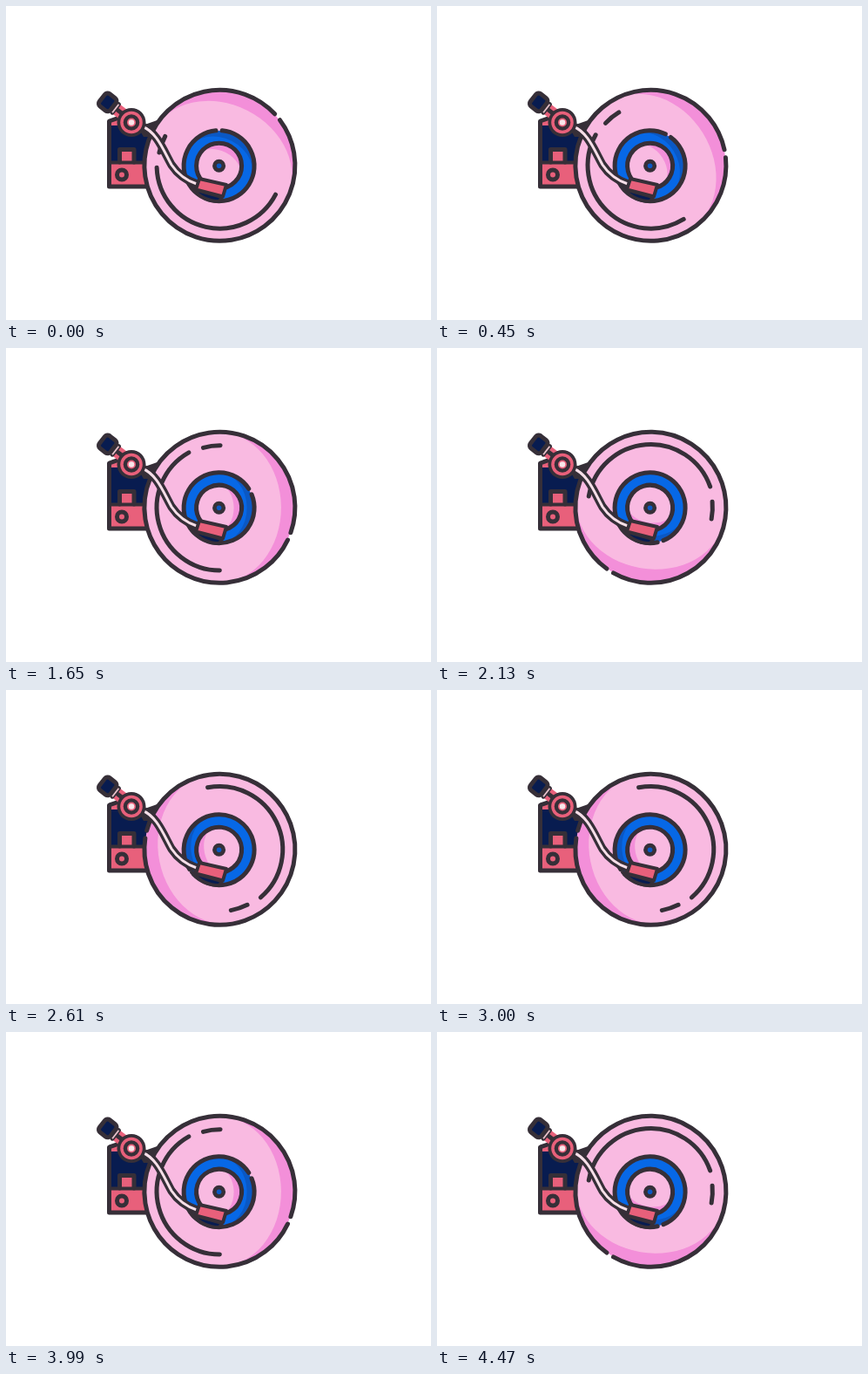
Recreate the animation shown at these times as an HTML page. Size 488 by 360 pixels, loop 4500 ms.

```html
<!DOCTYPE html>
<html>
<head>
<meta charset="utf-8">
<style>
  html, body { margin: 0; width: 100%; height: 100%; overflow: hidden; background: #fff; }
  svg { display: block; width: 100vw; height: 100vh; }
  .line { stroke: #362f38; stroke-width: 5; stroke-linecap: round; stroke-linejoin: round; }
  .thin { stroke-width: 4; }
  .none { fill: none; }
  .ink { fill: #362f38; }
  .pink { fill: #f9bae1; }
  .shade { fill: #f38fd9; }
  .blue { fill: #0768e6; }
  .deep { fill: #0b58c4; }
  .navy { fill: #081c50; }
  .red { fill: #e8607b; }
</style>
</head>
<body>
<svg viewBox="0 0 488 360">
  <!-- base -->
  <path class="line red" d="M118.500 132 L130 128 L158 139 L178 132 V207 H118.500 Z"/>
  <path class="navy" d="M121 137 H180 V179 H121 Z"/>
  <path class="ink" d="M152 140 L176 133 L174 150 L158 150 Z"/>
  <path class="line red" d="M130.500 179 V164.500 H147 V179"/>
  <path class="line thin" d="M119 179.500 H160"/>
  <circle class="line red" cx="133" cy="193.500" r="5.500"/>

  <!-- record -->
  <g transform="translate(245.400 182.800)">
    <g id="record">
      <circle class="pink" r="86"/>
      <path class="shade" id="discShade"/>
      <path class="line none" id="rim"/>
      <path class="line none" id="groove"/>
      <path class="line none" id="dash"/>
    </g>
  </g>
  <g transform="translate(244.600 183.200)">
    <g id="label">
      <circle class="blue" r="40"/>
      <path class="deep" id="ringShade"/>
      <path class="line none" id="labelRim"/>
      <circle class="pink" r="26"/>
      <path class="shade" id="labelShade"/>
      <circle class="line none" r="26"/>
    </g>
    <circle class="ink" r="7.500"/>
    <circle class="deep" r="2.800"/>
  </g>

  <!-- counterweight, with x along the axis to the pivot -->
  <g transform="translate(117.500 111) rotate(38)">
    <rect class="red" x="10" y="-7" width="14" height="14"/>
    <rect class="line navy" x="-9" y="-9" width="16" height="18" rx="4"/>
    <path class="line" d="M10.500 -6 V6 M12 0 H20"/>
    <path d="M10.500 -6 V6" stroke="#e9c3cc" stroke-width="1.800"/>
  </g>

  <!-- tonearm -->
  <path class="line none" style="stroke-width:9.500" d="M156 138 C173 144 181 166 190 182 C198 194 207 200 219 204"/>
  <path class="none" stroke="#f6dfe8" stroke-width="3" d="M156 138 C173 144 181 166 190 182 C198 194 207 200 219 204"/>
  <g transform="translate(144 133.500)">
    <circle class="ink" r="16.500"/>
    <circle class="red" r="12.800"/>
    <circle class="ink" r="9.300"/>
    <circle class="red" r="5"/>
    <circle r="3.300" fill="#f8e6ea"/>
  </g>
  <path class="line thin navy" d="M213 209 L248 219 L245 224 Q227 224 213 209 Z"/>
  <path class="line thin red" d="M222 198 L253 205 L249 218.500 L218 210.500 Z"/>
</svg>
<script>
  const $ = id => document.getElementById(id);
  const point = (r, deg) => {
    const a = deg * Math.PI / 180;
    return `${r * Math.cos(a)} ${r * Math.sin(a)}`;
  };
  const arc = (id, r, from, to) => $(id).setAttribute('d',
    `M${point(r, from)} A${r} ${r} 0 ${+(to - from > 180)} 1 ${point(r, to)}`);
  const crescent = (id, r, depth) => {
    $(id).setAttribute('d', `M0 ${-r} A${r} ${r} 0 0 1 0 ${r} A${r - depth} ${r} 0 0 0 0 ${-r} Z`);
    $(id).setAttribute('transform', 'rotate(-63)');
  };

  arc('rim', 86.5, -37, 317);
  arc('groove', 72.3, 27.5, 178);
  arc('dash', 71, 192, 208);
  arc('labelRim', 40.5, -85, 265);
  crescent('discShade', 86, 15.5);
  crescent('ringShade', 40, 8);
  crescent('labelShade', 26, 9);

  // The record turns in 11 held poses per revolution of 390 ms.
  const LOOP = 4500, TURN = 390, POSES = 11;
  function draw() {
    const pose = Math.floor((performance.now() % LOOP) * POSES / TURN) % POSES;
    const phase = pose / POSES;
    const angle = 360 * phase - 3.2 * Math.sin(2 * Math.PI * phase);
    for (const id of ['record', 'label']) $(id).setAttribute('transform', `rotate(${angle})`);
    requestAnimationFrame(draw);
  }
  draw();
</script>
</body>
</html>
```
